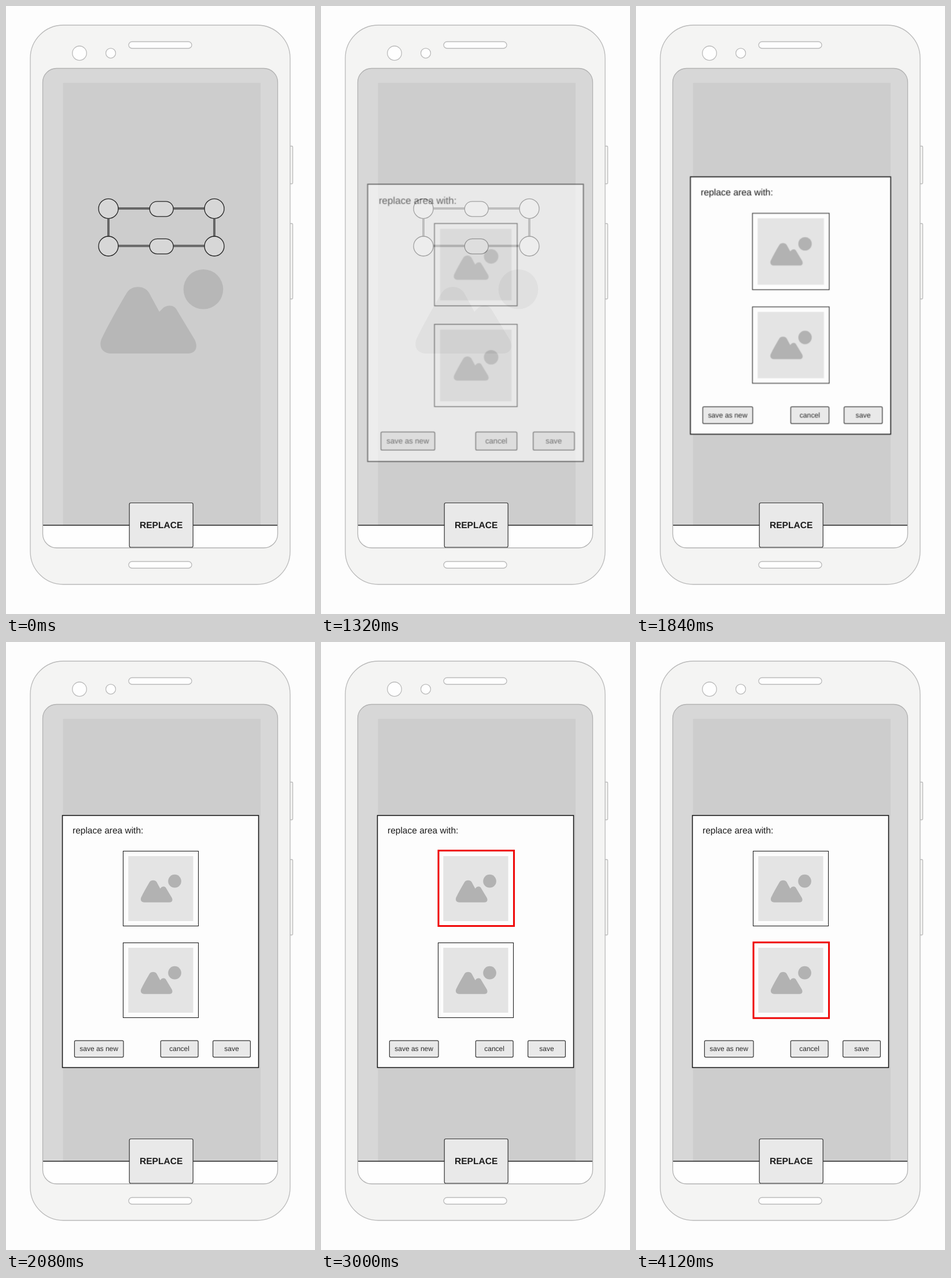
Recreate the animation shown at these times as an HTML page. Size 534 px wide and 1048 px high, loop 4.64 s.

```html
<!DOCTYPE html>
<html lang="en">
<head>
<meta charset="utf-8">
<title>Replace area dialog</title>
<style>
  html, body { margin: 0; width: 100%; height: 100%; overflow: hidden; background: #fdfdfd; }
  svg { display: block; width: 534px; height: 1048px; }
  text { font-family: "Liberation Sans", Arial, sans-serif; fill: #1c1c1c; text-rendering: geometricPrecision; }

  .body { fill: #f4f4f3; stroke: #bababa; stroke-width: 1.3; }
  .hole { fill: #fefefe; stroke: #bababa; stroke-width: 1.3; }
  .bars { fill: none; stroke: #666; stroke-width: 4; }
  .grips { fill: #d7d7d7; stroke: #222; stroke-width: 1.3; }
  .button { fill: #e9e9e9; stroke: #333; stroke-width: 1.2; }
  .label { font-size: 12px; text-anchor: middle; fill: #2c2c2c; }
  .frame { fill: #fdfdfd; stroke: #222; stroke-width: 1.1; }
  .picked { fill: none; stroke: #f00808; stroke-width: 3; }
  .dot { fill: #f00; stroke: #000; stroke-width: 5; }

  .dialog, .dot, .picked { animation: 4640ms linear infinite; }
  .dialog { transform-origin: 267px 516px; animation-name: dialog; }
  .dot { transform-box: fill-box; transform-origin: center; }
  .tap1 { animation-name: tap1; }
  .tap2 { animation-name: tap2; }
  .tap3 { animation-name: tap3; }
  .pick1, .pick2 { animation-timing-function: step-end; }
  .pick1 { animation-name: pick1; }
  .pick2 { animation-name: pick2; }

  /* rises while fading in, then shrinks to its final size */
  @keyframes dialog {
    0%, 21.552% { opacity: 0; transform: translateY(71.8px) scale(1.1); }
    33.405% { opacity: 1; transform: translateY(0) scale(1.1); animation-timing-function: cubic-bezier(.39, .575, .565, 1); }
    44.828%, 100% { opacity: 1; transform: translateY(0) scale(1); }
  }
  @keyframes tap1 {
    0%, 8.621% { opacity: 0; transform: scale(.45); }
    10.172%, 17.241% { opacity: 1; transform: scale(1); }
    20.69%, 100% { opacity: 0; transform: scale(1); }
  }
  @keyframes tap2 {
    0%, 56.034% { opacity: 0; transform: scale(.45); }
    57.586%, 61.207% { opacity: 1; transform: scale(1); }
    64.655%, 100% { opacity: 0; transform: scale(1); }
  }
  @keyframes tap3 {
    0%, 73.276% { opacity: 0; transform: scale(.45); }
    74.828%, 78.448% { opacity: 1; transform: scale(1); }
    81.897%, 100% { opacity: 0; transform: scale(1); }
  }
  @keyframes pick1 {
    0% { opacity: 0; }
    61.207% { opacity: 1; }
    78.448%, 100% { opacity: 0; }
  }
  @keyframes pick2 {
    0% { opacity: 0; }
    78.448%, 100% { opacity: 1; }
  }
</style>
</head>
<body>
<svg viewBox="0 0 534 1048">
  <defs>
    <g id="picture">
      <path d="M182 599C166 599 160 587 165 574C177 549 194 519 209 494C217 481 239 481 247 494L265 527L272 520C279 515 289 515 294 522L326 575C332 587 329 599 314 599Z"/>
      <circle cx="341" cy="488.300" r="34.300"/>
    </g>
    <g id="thumb">
      <rect class="frame" x="202.500" y="360.500" width="130" height="129"/>
      <rect x="211.300" y="369" width="112.200" height="112" fill="#e4e4e4"/>
      <use href="#picture" fill="#b2b2b2" transform="translate(179 251) scale(.33)"/>
    </g>
    <clipPath id="screen"><rect x="63.500" y="107.500" width="406" height="826.500" rx="24"/></clipPath>
  </defs>

  <rect width="534" height="1048" fill="#fdfdfd"/>

  <!-- phone -->
  <g class="body">
    <rect x="486" y="241.500" width="9.500" height="65" rx="1.500"/>
    <rect x="486" y="375" width="9.500" height="130" rx="1.500"/>
    <rect x="42" y="33" width="449" height="964" rx="57"/>
  </g>
  <g class="hole">
    <circle cx="127" cy="81.300" r="12.300"/>
    <circle cx="181" cy="81.300" r="8.500"/>
    <rect x="212" y="61.500" width="109" height="11.500" rx="5.750"/>
    <rect x="212" y="957.500" width="109" height="11.500" rx="5.750"/>
  </g>

  <!-- screen -->
  <g clip-path="url(#screen)">
    <rect x="63" y="107" width="407" height="828" fill="#fefefe"/>
    <rect x="63" y="107" width="407" height="788" fill="#d7d7d7"/>
    <rect x="98.500" y="132.500" width="341.500" height="762.500" fill="#cdcdcd"/>
    <path d="M63 895H470" stroke="#222" stroke-width="1.300"/>
  </g>
  <rect x="63.500" y="107.500" width="406" height="826.500" rx="24" fill="none" stroke="#b2b2b2" stroke-width="1.300"/>
  <use href="#picture" fill="#b7b7b7"/>

  <!-- selection -->
  <rect class="bars" x="177" y="349" width="183" height="64.500"/>
  <g class="grips">
    <circle cx="177" cy="349.300" r="17"/>
    <circle cx="360" cy="349.300" r="17"/>
    <circle cx="177" cy="414" r="17"/>
    <circle cx="360" cy="414" r="17"/>
    <rect x="248.200" y="336.800" width="41" height="26" rx="13"/>
    <rect x="248.200" y="401.300" width="41" height="26" rx="13"/>
  </g>

  <rect class="button" x="213.200" y="856.500" width="110" height="76.500" rx="2.500"/>
  <text x="268.200" y="900.300" font-size="15.600" font-weight="bold" text-anchor="middle">REPLACE</text>
  <circle class="dot tap1" cx="267" cy="894.500" r="21"/>

  <g class="dialog">
    <rect x="97.500" y="299" width="339" height="434.500" fill="#fdfdfd" stroke="#111" stroke-width="1.500"/>
    <text x="115" y="330" font-size="15.500">replace area with:</text>
    <use href="#thumb"/>
    <use href="#thumb" y="158"/>
    <rect class="picked pick1" x="203" y="359.500" width="130.500" height="130"/>
    <rect class="picked pick2" x="203" y="517.800" width="130.500" height="130.500"/>
    <rect class="button" x="118.400" y="687.200" width="84.600" height="28.400" rx="2"/>
    <rect class="button" x="267.300" y="687.200" width="64.800" height="28.400" rx="2"/>
    <rect class="button" x="357.600" y="687.200" width="64.800" height="28.400" rx="2"/>
    <text class="label" x="160.600" y="705">save as new</text>
    <text class="label" x="299.600" y="705">cancel</text>
    <text class="label" x="389.900" y="705">save</text>
  </g>
  <circle class="dot tap2" cx="274" cy="441" r="21"/>
  <circle class="dot tap3" cx="274" cy="599" r="21"/>
</svg>
</body>
</html>
```
